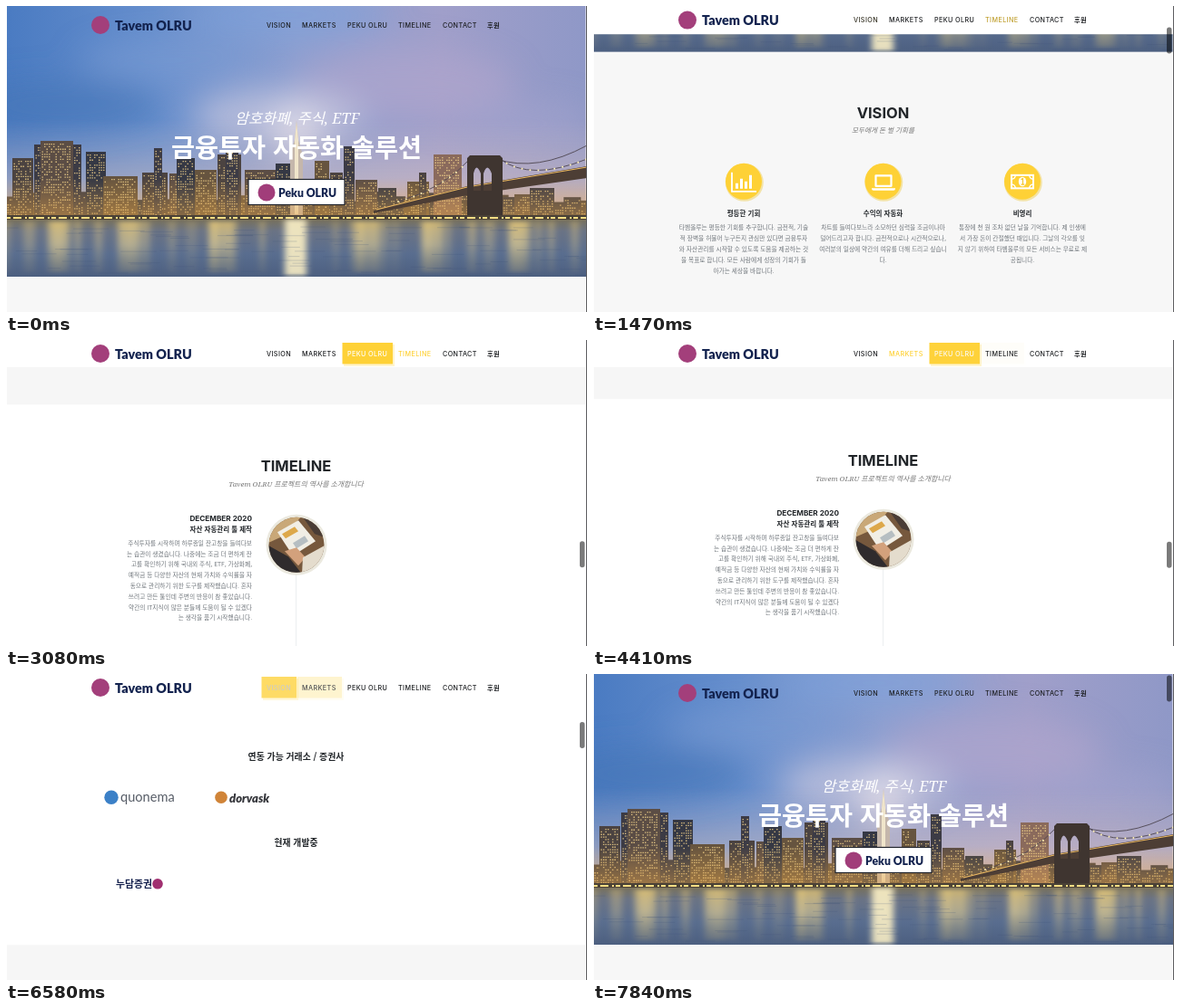
An HTML page that plays this animation: 640x338 px, repeating every 7910 ms.

```html
<!DOCTYPE html>
<html lang="ko">
<head>
<meta charset="utf-8">
<title>Landing page tour</title>
<style>
html, body { margin: 0; width: 100%; height: 100%; overflow: hidden; background: #fff; }
svg { display: block; width: 100vw; height: 100vh; }
text { font-family: 'Noto Sans CJK KR', 'Noto Sans CJK JP', sans-serif; }
.serif { font-family: 'Noto Serif', 'Noto Sans CJK KR', 'Noto Sans CJK JP', serif; font-style: italic; }
.title { font: 700 16.5px Inter, sans-serif; fill: #212529; }
.brand { font-family: Lato, sans-serif; font-weight: 900; fill: #13234f; }
.nav { font-family: Inter, 'Noto Sans CJK KR', 'Noto Sans CJK JP', sans-serif; font-size: 7.2px; letter-spacing: .4px; }
.head { font-weight: 700; fill: #212529; }
</style>
</head>
<body>
<svg viewBox="0 0 640 338" preserveAspectRatio="none">
  <defs>
    <linearGradient id="sky">
      <stop offset="0" stop-color="#4a7bc2"/><stop offset=".25" stop-color="#678fcd"/>
      <stop offset=".5" stop-color="#8d9fd0"/><stop offset=".75" stop-color="#a09fca"/>
      <stop offset="1" stop-color="#8f98c7"/>
    </linearGradient>
    <linearGradient id="horizon" x2="0" y2="1">
      <stop offset="0" stop-color="#d6bfc6" stop-opacity="0"/><stop offset="1" stop-color="#e3c4b4" stop-opacity=".75"/>
    </linearGradient>
    <linearGradient id="citylight" x2="0" y2="1">
      <stop offset="0" stop-color="#e6a548" stop-opacity="0"/><stop offset="1" stop-color="#e6a548" stop-opacity=".5"/>
    </linearGradient>
    <linearGradient id="water" x2="0" y2="1">
      <stop offset="0" stop-color="#77705c"/><stop offset=".2" stop-color="#6a7385"/>
      <stop offset=".6" stop-color="#596d8f"/><stop offset="1" stop-color="#4c5f80"/>
    </linearGradient>
    <linearGradient id="glint" x2="0" y2="1">
      <stop offset="0" stop-color="#eacb78"/><stop offset=".45" stop-color="#e0cd93" stop-opacity=".85"/>
      <stop offset="1" stop-color="#b5a777" stop-opacity=".3"/>
    </linearGradient>
    <filter id="soft" filterUnits="userSpaceOnUse" x="-80" y="-80" width="800" height="400"><feGaussianBlur stdDeviation="17"/></filter>
    <filter id="blur" filterUnits="userSpaceOnUse" x="-20" y="225" width="680" height="90"><feGaussianBlur stdDeviation="3.500 2"/></filter>
    <clipPath id="view"><rect x="1" width="637.5" height="338"/></clipPath>
    <clipPath id="hero"><rect width="640" height="299"/></clipPath>
    <clipPath id="lens"><circle cx="320" cy="226" r="30.5"/></clipPath>
  </defs>
  <rect width="640" height="338" fill="#fff"/>
  <g clip-path="url(#view)"><g id="page"></g></g>
  <g id="bar"></g>
  <rect id="thumb" x="632" width="5.5" height="29" rx="2.7" fill="#000" fill-opacity=".52"/>
  <rect x="639" width="1" height="338" fill="#5d5d60"/>
</svg>
<script>
const LOOP = 7910, SCROLL_MS = 1720, FADE_MS = 516;
const $ = id => document.getElementById(id);

// ---------- drawing helpers ----------
const rect = (x, y, w, h, fill, extra = '') =>
  `<rect x="${x}" y="${y}" width="${w}" height="${h}" fill="${fill}" ${extra}/>`;
const disc = (x, y, r, fill, extra = '') => `<circle cx="${x}" cy="${y}" r="${r}" fill="${fill}" ${extra}/>`;
const path = (d, fill, extra = '') => `<path d="${d}" fill="${fill}" ${extra}/>`;
const label = (str, x, y, size, { cls = '', fill = '', anchor = 'middle' } = {}) =>
  `<text x="${x}" y="${y}" class="${cls}" text-anchor="${anchor}" style="font-size:${size}px;${fill && 'fill:' + fill}">${str}</text>`;
const lines = (rows, x, y, anchor) =>
  rows.map((row, i) => label(row, x, y + i * 11.8, 6.7, { fill: '#6f757b', anchor })).join('');
const at = (y, content) => `<g transform="translate(0 ${y})">${content}</g>`;

let seed = 11;
const rand = () => (seed = (seed * 16807) % 2147483647) / 2147483647;

// ---------- hero ----------
function building(x, top, w, color) {
  let lit = '';
  for (let wy = top + 3; wy < 231; wy += 2.8)
    for (let wx = x + 1.5; wx < x + w - 2; wx += 2.5)
      if (rand() < .55) lit += `M${wx} ${wy}h1.5v1.3h-1.5z`;
  return rect(x, top, w, 236 - top, color) + path(lit, '#f3d38b', 'opacity=".78"');
}

function skyline() {
  const tones = ['#4b4341', '#3c3b45', '#5b4d45', '#353844', '#66543f'];
  let out = '';
  for (let x = 0; x < 640; x += 9 + rand() * 12)
    out += building(x, 203 + rand() * 14, 19, tones[Math.floor(rand() * 5)]);
  [[7, 168, 23], [31, 153, 52], [38, 149, 36], [88, 161, 22], [107, 188, 38], [150, 184, 28],
   [163, 157, 9], [180, 185, 30], [188, 168, 20], [208, 181, 24], [233, 164, 26], [242, 159, 14],
   [263, 181, 34], [297, 174, 22], [340, 171, 16], [357, 184, 14], [372, 155, 12], [385, 192, 24],
   [410, 201, 20], [442, 194, 24], [455, 184, 8], [577, 201, 27]]
    .forEach(([x, top, w], i) => out += building(x, top, w, tones[i % 5]));
  return out + building(471, 164, 31, '#8a6a5c') +
    path('M313 235V165L318 148L320 126L322 148L327 165V235z', '#c4b6ab') +
    path('M318 148L320 128L322 148V230H318z', '#fff4d6', 'opacity=".75"') +
    rect(0, 190, 640, 45, 'url(#citylight)');
}

function bridge() {
  const stone = '#3f3530';
  let out = path('M405 226L508 199L640 177V190L508 209L405 229z', '#4d3e35') +
    path('M408 225L508 200L640 178', 'none', 'stroke="#eebb62" stroke-width="1.1"') +
    path('M432 216Q482 202 512 168M544 169Q578 194 640 169M540 169Q585 184 640 154', 'none', 'stroke="#4d4650" stroke-width=".9"') +
    path('M432 216Q482 202 512 168M544 169Q578 194 640 169', 'none', 'stroke="#fff0b5" stroke-width="2" stroke-linecap="round" stroke-dasharray="0 9"');
  return out + path('M508 234V168L511 165H544L547 168V234H535V185Q530 172 526 185V234H523V185Q518 172 515 185V207H540V234z', stone) +
    rect(508, 204, 39, 30, stone);
}

function hero() {
  const cloud = (x, y, rx, ry, fill, o) =>
    `<ellipse cx="${x}" cy="${y}" rx="${rx}" ry="${ry}" fill="${fill}" opacity="${o}"/>`;
  const clouds = cloud(440, 85, 120, 38, '#b3a6cd', .6) + cloud(300, 122, 95, 30, '#c6c6de', .75) +
    cloud(320, 140, 30, 30, '#f2ecef', .6) + cloud(180, 60, 100, 22, '#7f9dd4', .5) +
    cloud(310, 10, 110, 24, '#7da2dd', .6) + cloud(60, 110, 110, 28, '#4475b6', .6) +
    cloud(570, 130, 80, 25, '#a3a3cd', .6);
  const streak = (x, w, o) => rect(x - w / 2, 238, w, 56, 'url(#glint)', `opacity="${o}"`);
  let glints = '';
  for (let i = 0; i < 26; i++) glints += streak(i * 25 + rand() * 14, 5 + rand() * 9, .2 + rand() * .4);
  [58, 135, 236, 398, 470, 565].forEach(x => glints += streak(x, 24, .7));
  glints += rect(307, 236, 24, 62, '#f5ebc5', 'opacity=".9"');
  let ripples = '';
  for (let i = 0; i < 90; i++) ripples += `M${rand() * 640} ${244 + rand() * 53}h${12 + rand() * 30}`;
  return `<g clip-path="url(#hero)">` +
    rect(0, 0, 640, 240, 'url(#sky)') + `<g filter="url(#soft)">${clouds}</g>` +
    rect(0, 125, 640, 110, 'url(#horizon)') +
    skyline() + bridge() +
    rect(0, 231, 640, 6, '#4a4136') + path('M0 234H640', 'none', 'stroke="#ffdf85" stroke-width="1.8" stroke-dasharray="5 3 9 4 2 2"') +
    rect(0, 236, 640, 63, 'url(#water)') + `<g filter="url(#blur)">${glints}</g>` +
    path(ripples, 'none', 'stroke="#40557a" stroke-width=".7" opacity=".3"') + '</g>' +
    label('암호화폐, 주식, ETF', 320.5, 130, 16.4, { cls: 'serif', fill: '#fff' }) +
    `<g font-weight="700">${label('금융투자 자동화 솔루션', 320, 167, 28.3, { fill: '#fff' })}</g>` +
    rect(267, 191.5, 106, 28, '#fff', 'stroke="#20242c" stroke-width="1.2"') +
    disc(287, 206, 9.5, '#a13d7a') + label('Peku OLRU', 300, 210.5, 12.2, { cls: 'brand', anchor: 'start' });
}

// ---------- page sections ----------
function vision() {
  const icons = [
    path('M153 184V205H180', 'none', 'stroke="#fff" stroke-width="1.8"') +
      path('M157 196h3v6h-3zM162 191h3v11h-3zM167 194h3v8h-3zM172 187h3v15h-3z', '#fff'),
    path('M311.5 187.5H328.5V199H311.5z', 'none', 'stroke="#fff" stroke-width="2.2" stroke-linejoin="round"') +
      path('M307 201.5H333V202Q333 204 331 204H309Q307 204 307 202z', '#fff'),
    rect(461, 187, 24, 14.5, 'none', 'stroke="#fff" stroke-width="2"') +
      path('M461 191.5Q465 191 465.5 187M480.5 187Q481 191 485 191.5M461 197Q465 197.5 465.5 201.5M480.5 201.5Q481 197.5 485 197', 'none', 'stroke="#fff" stroke-width="1.2"') +
      `<ellipse cx="473" cy="194.2" rx="4.2" ry="5.2" fill="#fff"/>` +
      path('M471.5 191.8L473.5 190.8V197M471.5 197.2H475.3', 'none', 'stroke="#f3c52d" stroke-width="1.2"')
  ];
  const columns = [
    [166, '평등한 기회', ['타벰올루는 평등한 기회를 추구합니다. 금전적, 기술', '적 장벽을 허물어 누구든지 관심만 있다면 금융투자',
      '와 자산관리를 시작할 수 있도록 도움을 제공하는 것', '을 목표로 합니다. 모든 사람에게 성장의 기회가 돌', '아가는 세상을 바랍니다.']],
    [319.5, '수익의 자동화', ['차트를 들여다보느라 소모하던 심력을 조금이나마', '덜어드리고자 합니다. 금전적으로나 시간적으로나,',
      '여러분의 일상에 약간의 여유를 더해 드리고 싶습니', '다.']],
    [473, '비영리', ['통장에 천 원 조차 없던 날을 기억합니다. 제 인생에', '서 가장 돈이 간절했던 때입니다. 그날의 각오를 잊',
      '지 않기 위하여 타벰올루의 모든 서비스는 무료로 제', '공됩니다.']]
  ];
  return label('VISION', 319.5, 124, 16.5, { cls: 'title' }) +
    label('모두에게 돈 벌 기회를', 319.5, 140.5, 7.6, { cls: 'serif', fill: '#777' }) +
    columns.map(([x, head, rows], i) =>
      disc(x + .8, 195, 21, '#f3e3a6') + disc(x, 194, 20, '#fed136') + icons[i] +
      label(head, x, 231.7, 7.5, { cls: 'head' }) + lines(rows, x, 247.5)).join('');
}

function markets() {
  return label('연동 가능 거래소 / 증권사', 319.5, 76.5, 9.9, { cls: 'head' }) +
    disc(116, 118, 7.7, '#3b80c7') +
    `<text x="126" y="122.5" style="font:400 14.6px Lato,sans-serif" fill="#565c66">quonema</text>` +
    `<text x="246" y="124" style="font:italic 900 13px Lato,sans-serif" fill="#34353a">dorvask</text>` +
    disc(237, 118, 6.8, '#d08438') +
    label('현재 개발중', 319.5, 171.5, 9.8, { cls: 'head' }) +
    `<g font-weight="700">${label('누담증권', 121, 218, 10.9, { fill: '#14204d', anchor: 'start' })}</g>` +
    disc(167, 213.5, 5.8, '#a02f70');
}

function timeline() {
  const photo = `<g clip-path="url(#lens)">` + rect(288, 194, 64, 64, '#76583d') +
    path('M288 194H326L306 216L288 224z', '#c9a878') +
    path('M299 212L322 199L341 222L316 238z', '#f1eee5') +
    path('M304 214L318 206L322 211L308 219z', '#dda84a') + path('M316 224L329 216L333 222L320 230z', '#b6bec2') +
    path('M326 194H352V218L340 214z', '#4a3d36') +
    path('M288 226L311 239L326 258H288z', '#2f2b2d') + path('M307 233L320 229L330 240L322 249z', '#d3a17c') +
    path('M327 240L352 226V258H326z', '#e4dccd') + '</g>';
  return label('TIMELINE', 319.5, 145, 16.5, { cls: 'title' }) +
    label('Tavem OLRU 프로젝트의 역사를 소개합니다', 319.5, 161.5, 7.9, { cls: 'serif', fill: '#777' }) +
    rect(319, 193, 1, 400, '#eceef0') + disc(320, 226, 33.5, '#ebe9df') + photo +
    `<text x="271" y="200" text-anchor="end" style="font:700 8.2px Inter,sans-serif" fill="#212529">DECEMBER 2020</text>` +
    label('자산 자동관리 툴 제작', 271, 212, 7.5, { cls: 'head', anchor: 'end' }) +
    lines(['주식투자를 시작하며 하루종일 잔고창을 들여다보', '는 습관이 생겼습니다. 나중에는 조금 더 편하게 잔',
      '고를 확인하기 위해 국내외 주식, ETF, 가상화폐,', '예적금 등 다양한 자산의 현재 가치와 수익률을 자',
      '동으로 관리하기 위한 도구를 제작했습니다. 혼자', '쓰려고 만든 툴인데 주변의 반응이 참 좋았습니다.',
      '약간의 IT지식이 많은 분들께 도움이 될 수 있겠다', '는 생각을 품기 시작했습니다.'], 271, 226.5, 'end');
}

$('page').innerHTML = rect(0, 298, 640, 312, '#f7f7f7') + rect(0, 881, 640, 1685, '#f6f6f6') +
  hero() + at(248, vision()) + at(600, markets()) + at(2495, timeline());

// ---------- navigation ----------
// x, width, scroll position that activates the link, hover interval
const links = [
  { name: 'VISION', x: 287, w: 27, from: 267, hover: [250, 1150] },
  { name: 'MARKETS', x: 326, w: 38, from: 594, hover: [3850, 5900] },
  { name: 'PEKU OLRU', x: 376, w: 44, from: 860 },
  { name: 'TIMELINE', x: 432, w: 37, from: 2529, hover: [1250, 3700] },
  { name: 'CONTACT', x: 481, w: 38, from: Infinity },
  { name: '후원', x: 530, w: 13, from: Infinity, weight: 700 }
];
$('bar').innerHTML = rect(1, 0, 638, 30, '#fff', 'id="barBg"') + '<g id="menu">' +
  disc(104, 15, 10, '#a33f7b') + label('Tavem OLRU', 120, 20.5, 14.4, { cls: 'brand', anchor: 'start' }) +
  links.map(({ name, x, w, weight = 500 }, i) => `<g id="pill${i}">` +
    rect(x - 4, 5, w + 12, 24, '#fff0b8', 'opacity=".7"') + rect(x - 5.5, 3, w + 11.5, 23.5, '#fed136') + '</g>' +
    `<text id="link${i}" class="nav" font-weight="${weight}" x="${x}" y="17.6">${name}</text>`).join('') + '</g>';

// ---------- motion ----------
const moves = [[374, 0, 268], [1791, 266, 2530], [3985, 2530, 596], [6098, 596, 0]];

function expoInOut(p) {
  if (p <= 0 || p >= 1) return p <= 0 ? 0 : 1;
  return p < .5 ? 2 ** (20 * p - 10) / 2 : 1 - 2 ** (10 - 20 * p) / 2;
}

function scrollAt(t) {
  const move = moves.filter(m => t >= m[0]).pop();
  if (!move) return 0;
  const [start, a, b] = move;
  return a + (b - a) * expoInOut((t - start) / SCROLL_MS);
}

// Turns an on/off rule into a level that eases towards each new state.
function transition(isOn) {
  const steps = [{ t: -FADE_MS, from: 0, to: 0 }];
  const level = t => {
    const { t: start, from, to } = steps.filter(s => s.t <= t).pop();
    const p = Math.min(1, (t - start) / FADE_MS);
    return from + (to - from) * (1 - (1 - p) ** 2.3);
  };
  for (let t = 0; t < LOOP; t += 5) {
    const to = isOn(t) ? 1 : 0;
    if (to !== steps[steps.length - 1].to) steps.push({ t, from: level(t), to });
  }
  return level;
}

const shrunk = transition(t => scrollAt(t) > 65);
links.forEach((link, i) => {
  const until = links[i + 1] ? links[i + 1].from : Infinity;
  link.active = transition(t => scrollAt(t) >= link.from && scrollAt(t) < until);
  link.hovered = transition(t => link.hover && t >= link.hover[0] && t < link.hover[1]);
});

const mix = (a, b, p) => a.map((v, i) => v + (b[i] - v) * p);
const DARK = [28, 30, 33], YELLOW = [254, 209, 54], WHITE = [255, 255, 255];

function render(t) {
  const y = scrollAt(t), small = shrunk(t);
  $('page').setAttribute('transform', `translate(0 ${-y.toFixed(2)})`);
  $('barBg').setAttribute('height', 42 - 12 * small);
  $('barBg').setAttribute('opacity', Math.min(1, small * 1.2));
  $('menu').setAttribute('transform', `translate(0 ${6 * (1 - small)})`);
  links.forEach((link, i) => {
    const on = link.active(t);
    const color = mix(mix(DARK, YELLOW, link.hovered(t)), WHITE, on);
    $('pill' + i).setAttribute('opacity', on);
    $('link' + i).setAttribute('fill', `rgb(${color.map(Math.round)})`);
  });
  $('thumb').setAttribute('y', 1.5 + y * .0885);
  $('thumb').setAttribute('visibility', t < 400 ? 'hidden' : 'visible');
}

const begin = performance.now();
function tick() {
  render((performance.now() - begin) % LOOP);
  requestAnimationFrame(tick);
}
tick();
</script>
</body>
</html>
```
